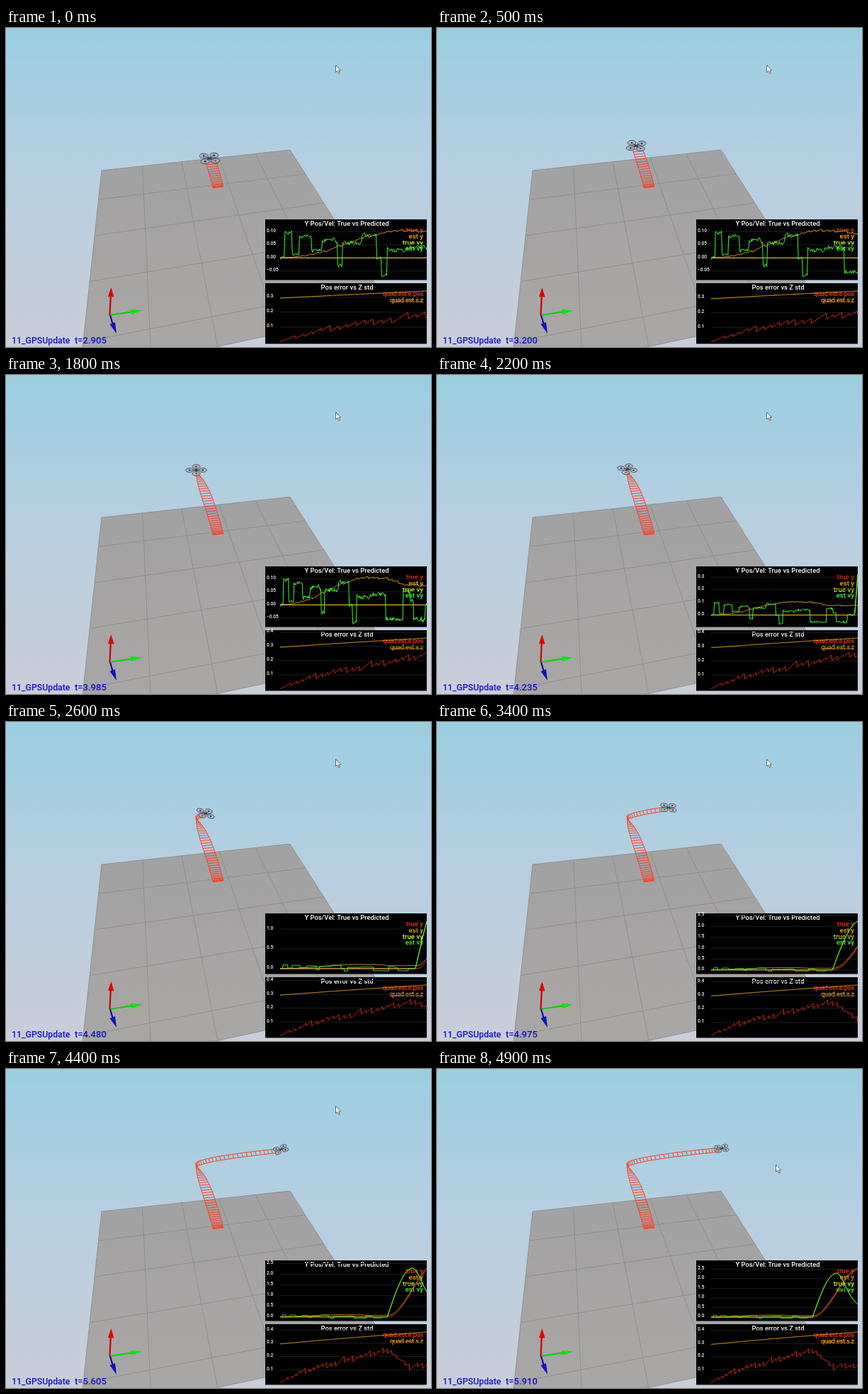
Animation of 600x450 px, one loop 5 s. Source, as an HTML page:

```html
<!DOCTYPE html>
<html lang="en">
<head>
<meta charset="utf-8">
<title>GPS update simulation</title>
<style>
html, body { margin: 0; width: 100%; height: 100%; overflow: hidden; background: #b4cfe0; }
svg { display: block; width: 100vw; height: 100vh; }
text { font-family: Roboto, "Open Sans", sans-serif; font-weight: 500; }
.status { font-size: 12.3px; fill: #1212d2; }
.title { font-size: 9.4px; fill: #fff; text-anchor: middle; }
.legend { font-size: 9.7px; text-anchor: end; }
.tight { letter-spacing: -.5px; }
.tick { font-size: 6.6px; fill: #fff; }
.grid { stroke: #1d1d1d; fill: none; }
.line { fill: none; stroke-linejoin: round; }
.rotor { fill: #a3adb8; fill-opacity: .75; stroke: #3a3d42; stroke-width: .9; }
</style>
</head>
<body>
<svg viewBox="0 0 600 450">
  <defs>
    <linearGradient id="sky" x2="0" y2="1">
      <stop offset="0" stop-color="#9bcee0"/>
      <stop offset=".45" stop-color="#b5cfe1"/>
      <stop offset="1" stop-color="#cacdd9"/>
    </linearGradient>
    <linearGradient id="ground" x2="0" y2="1">
      <stop offset="0" stop-color="#a2a1a1"/>
      <stop offset="1" stop-color="#a9a7a6"/>
    </linearGradient>
  </defs>
  <rect width="600" height="450" fill="url(#sky)"/>
  <path id="floor" fill="url(#ground)" stroke="#8f9091"/>
  <path id="tiles" fill="none" stroke="#8f8f8f"/>

  <g stroke-width="2.2">
    <path d="M147 405L151 419" stroke="#0c0ca0"/>
    <path d="M146.500 418L154 415L156 431Z" fill="#1010c0"/>
    <path d="M147 405L177 400.500" stroke="#00d200"/>
    <path d="M176 397L192.500 398.500L177 404Z" fill="#00e600"/>
    <path d="M146.500 405.500L147.800 377" stroke="#c80000"/>
    <path d="M144 379L148.400 366L152.500 379.500Z" fill="#e10000"/>
  </g>

  <path id="trail" fill="none" stroke="#f5452a"/>
  <g id="drone"></g>

  <text class="status" x="8" y="444.500">11_GPSUpdate</text>
  <text class="status" x="97" y="444.500" style="font-size:13px" id="clock"></text>

  <g id="top">
    <rect x="366" y="270" width="228" height="85.500"/>
    <text class="title" x="481" y="279">Y Pos/Vel: True vs Predicted</text>
    <text class="legend" x="589" y="288" fill="#f03214">true y</text>
    <text class="legend" x="589" y="297" fill="#ffaa14">est y</text>
    <text class="legend" x="589" y="305.500" fill="#d2ff32">true vy</text>
    <text class="legend" x="589" y="314" fill="#46ff32">est vy</text>
  </g>
  <g id="bottom">
    <rect x="366" y="360" width="228" height="85.500"/>
    <text class="title" x="481.500" y="369">Pos error vs Z std</text>
    <text class="legend tight" x="589" y="378" fill="#f03214">quad.est.e.pos</text>
    <text class="legend tight" x="589" y="387" fill="#ffaa14">quad.est.s.z</text>
  </g>

  <path id="cursor" d="M0 0V10L2.400 8L4.200 12L5.800 11.200L4.100 7.400H7Z" fill="#fff" stroke="#444" stroke-width=".8"/>
</svg>
<script>
const $ = id => document.getElementById(id);

function add(parent, tag, attrs) {
  const el = document.createElementNS("http://www.w3.org/2000/svg", tag);
  for (const k in attrs) el.setAttribute(k, attrs[k]);
  return parent.appendChild(el);
}

const path = pts => "M" + pts.map(p => p[0].toFixed(1) + " " + p[1].toFixed(1)).join("L");
const mix = (a, b, f) => a + (b - a) * f;
const ramp = (a, b, t) => Math.min(1, Math.max(0, (t - a) / (b - a)));
const ease = f => f * f * (3 - 2 * f);

function noise(i) {
  const s = Math.sin(i * 127.1) * 43758.5453;
  return (s - Math.floor(s)) * 2 - 1;
}

// Steady drift with a random jump at every correction
function drift(t, period, seed) {
  const k = Math.floor(t / period);
  return .6 * noise(k + seed) + t / period - k - .5;
}

// Floor in perspective
function onFloor(u, v) {
  const w = 1 + .0216 * u - .097 * v;
  return [(135 + 61.85 * u - 17.07 * v) / w, (201 - 2.09 * u + 17.52 * v) / w];
}
const WIDE = 5, DEEP = 4.45;
$("floor").setAttribute("d",
  path([onFloor(0, 0), onFloor(WIDE, 0), onFloor(WIDE, DEEP), onFloor(0, DEEP)]) + "Z");
$("tiles").setAttribute("d", [1, 2, 3, 4].map(k =>
  path([onFloor(k, 0), onFloor(k, DEEP)]) + path([onFloor(0, k), onFloor(WIDE, k)])).join(""));

// Wall clock (ms) to simulated seconds
const CLOCK = [[0, 2.905], [1100, 3.55], [1800, 3.985], [2600, 4.48], [3400, 4.975], [4000, 5.36], [4900, 5.91]];

function simTime(wall) {
  const i = Math.max(1, CLOCK.findIndex(c => c[0] >= wall));
  const [a, from] = CLOCK[i - 1], [b, to] = CLOCK[i];
  return Math.round(mix(from, to, ramp(a, b, wall)) * 200) / 200;
}

// The flight: a climb, then a move to the side
const START = 1.9, SIDE = 4.18, END = 5.98;
const climb = t => ease(ramp(START, 4.1, t));
const hop = t => ease(ramp(SIDE, END, t));

function centre(t) {
  const p = climb(t), h = hop(t);
  return [
    mix(299.5, 269, p) + 8 * p * (1 - p) + 129 * h,
    mix(224.7, 135.5, p) - 21.5 * h ** .6
  ];
}

function drawTrail(now) {
  const left = [], right = [];
  let d = "";
  for (let t = START; t <= now; t += .06) {
    const [x, y] = centre(t), turn = climb(t) ** 6;
    const dx = mix(7.4, .8, turn), dy = mix(-.8, 2.8, turn);
    left.push([x - dx, y - dy]);
    right.push([x + dx, y + dy]);
    d += path([left.at(-1), right.at(-1)]);
  }
  $("trail").setAttribute("d", d + path(left) + path(right));
}

const drone = $("drone");
const arms = add(drone, "path", { stroke: "#33363c", "stroke-width": 1.6 });
const rotors = [0, 1, 2, 3].map(() => add(drone, "ellipse", { class: "rotor", rx: 6.4, ry: 3.6 }));
const hubs = rotors.map((r, i) =>
  add(drone, "circle", { r: 1.3, fill: i ? "#2a2d34" : "#b4452e" }));
add(drone, "ellipse", { rx: 3.2, ry: 2, fill: "#3f4655" });

function drawDrone(t) {
  const [x, y] = centre(t);
  const lead = mix(-.8, 4.5, ramp(0, .1, hop(t)));
  const roll = 18 * Math.sin(2 * Math.PI * ramp(SIDE, END, t));
  const yaw = Math.min(128, 38 + 48 * (t - 2.905));
  const size = .95 - .09 * (t - 2.905);
  drone.setAttribute("transform",
    `translate(${x + lead} ${y - 2}) rotate(${roll}) scale(${size})`);
  const tips = rotors.map((r, i) => {
    const a = (yaw + i * 90) * Math.PI / 180;
    return [11 * Math.cos(a), 5.8 * Math.sin(a)];
  });
  tips.forEach(([cx, cy], i) => [rotors[i], hubs[i]].forEach(el => {
    el.setAttribute("cx", cx);
    el.setAttribute("cy", cy);
  }));
  arms.setAttribute("d", path([tips[0], tips[2]]) + path([tips[1], tips[3]]));
}

// Velocity estimate while climbing: time of each jump and the level after it
const JUMPS = [
  [0, 0], [.28, .1], [.42, .015], [.56, .085], [.78, .03], [.97, .065], [1.26, -.03],
  [1.34, .055], [1.7, .087], [1.97, .007], [2.06, -.068], [2.17, .03], [2.52, .04],
  [2.93, -.055], [3.38, .055], [3.55, .02], [3.65, -.055], [3.95, 0]
];

const T0 = .2, STEP = .015, X0 = 387, X1 = 594;
const RISE = 4.15, PEAK = 5.09;

function trueVy(t) {
  if (t < PEAK) return 2.28 * Math.sin(Math.PI / 2 * ramp(RISE, PEAK, t));
  return 2.28 / (1 + ((t - PEAK) / .53) ** 2);
}
function estVy(t, i) {
  const level = t < RISE ? JUMPS.findLast(j => j[0] <= t)[1] : trueVy(t);
  return level + .007 * noise(i) + (t > .28 ? .007 * drift(t, .11, 5) : 0);
}
const trueY = t => 2.48 * hop(t);
const estY = t => .105 * Math.sin(Math.PI * (Math.min(t, 3.45) - T0) / 4.8) ** 2
  + .006 * ramp(T0, 1, t) * drift(t, .13, 2) + trueY(t);
function posErr(t) {
  const trend = .25 * ramp(T0, RISE, t) ** .75 - .125 * ease(ramp(4.2, 5, t));
  return Math.max(0, trend + .028 * ramp(T0, .8, t) * drift(t, .16, 9));
}
const zStd = t => Math.sqrt(.0864 + .0113 * (t - T0));

// A plot whose scale follows the largest value so far
function makePlot(id, top, low, yLow, yHigh, minHigh, series) {
  const box = $(id), bottom = top + 85.5;
  const grid = add(box, "path", { class: "grid" });
  const ticks = Array.from({ length: 8 }, () => add(box, "text", { class: "tick", x: 368 }));
  const lines = series.map(s => add(box, "path", { class: "line", stroke: s[0] }));

  return now => {
    const times = [];
    for (let t = T0; t < now; t += STEP) times.push(t);
    times.push(now);
    const data = series.map(s => times.map(s[1]));
    const high = Math.max(minHigh, ...data.flat());
    const scale = (yLow - yHigh) / (high - low);
    const yOf = v => yLow - (v - low) * scale;
    const xOf = t => mix(X0, X1, (t - T0) / (now - T0));
    data.forEach((vals, n) =>
      lines[n].setAttribute("d", path(vals.map((v, i) => [xOf(times[i]), yOf(v)]))));

    const step = [.05, .1, .2, .5].find(s => (high - low) / s < 5.5) || 1;
    let d = "", k = Math.ceil(low / step);
    for (const tick of ticks) {
      const y = yOf(k * step);
      const shown = y > top + 2.5 && y < bottom - 4;
      tick.textContent = shown ? (k * step).toFixed(step < .1 ? 2 : 1).replace("-", "−") : "";
      tick.setAttribute("y", y + .5);
      if (shown) d += `M${X0} ${y.toFixed(1)}H${X1}`;
      k++;
    }
    grid.setAttribute("d", d);
  };
}

const plots = [
  makePlot("top", 270, -.075, 352, 281, .117, [
    ["#e6321a", trueY], ["#e1a01a", estY], ["#e6e61e", trueVy], ["#46f532", estVy]
  ]),
  makePlot("bottom", 360, 0, 443, 371, .3, [["#d72d1a", posErr], ["#f0a514", zStd]])
];

let last = -1;
function frame(ms) {
  const wall = Math.floor(ms % 5000 / 100) * 100;
  if (wall !== last) {
    last = wall;
    const t = simTime(wall);
    $("clock").textContent = "t=" + t.toFixed(3);
    drawTrail(t);
    drawDrone(t);
    plots.forEach(draw => draw(t));
    const m = ramp(4500, 4800, wall);
    $("cursor").setAttribute("transform", `translate(${465.5 + 13 * m} ${52.5 + 82.5 * m})`);
  }
  requestAnimationFrame(frame);
}
frame(performance.now());
</script>
</body>
</html>
```
